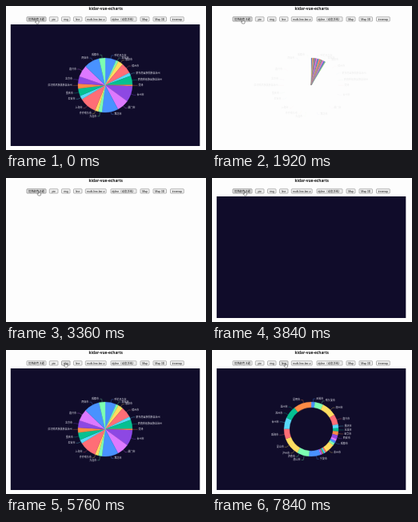
Write an HTML page that moves like this. It is 250x180 px and loops after 8000 ms.

```html
<!DOCTYPE html>
<html lang="zh">
<head>
<meta charset="utf-8">
<title>kidar-vue-echarts</title>
<style>
  html, body { margin: 0; width: 100%; height: 100%; overflow: hidden; background: #fdfdfd; }
  svg { display: block; width: 100vw; height: 100vh; }
  text { font-family: "Liberation Sans", "Noto Sans CJK SC", "Noto Sans CJK", sans-serif; dominant-baseline: central; }
  .title { font: 700 4.8px "Open Sans", sans-serif; text-anchor: middle; fill: #111; }
  .btn rect { fill: #efefef; stroke: #767676; stroke-width: .5; }
  .btn text { font-size: 3.4px; text-anchor: middle; fill: #111; }
  .btn.hover rect { fill: #e3e3e3; stroke: #555; }
  .labels text { font-size: 3px; }
  .labels path { fill: none; stroke-width: .3; }
  .sector { stroke-width: .3; }
</style>
</head>
<body>
<svg viewBox="0 0 250 180">
  <rect width="250" height="180" fill="#fdfdfd"/>
  <text class="title" x="124.8" y="3.1">kidar-vue-echarts</text>
  <g id="buttons"></g>
  <rect id="panel" x="5.8" y="23" width="236.5" height="152" fill="#100c2a"/>
  <g id="charts"></g>
  <path id="cursor" d="M-.5 .4Q0-.4 .5 .4V2.3L2.3 2.8Q2.8 3 2.6 4L2.1 5.8H-.7L-2.1 3.5Q-1.7 2.7-.5 3.5Z"
    fill="#fff" stroke="#222" stroke-width=".45"/>
</svg>
<script>
const LOOP = 8000, STEP = 160, GROW = 1000;
const CX = 124, CY = 99, R = 34;
const DARK = ['#4992ff', '#7cffb2', '#fddd60', '#ff6e76', '#58d9f9', '#05c091', '#ff8a45', '#8d48e3', '#dd79ff'];
const LIGHT = ['#5470c6', '#91cc75', '#fac858', '#ee6666', '#73c0de', '#3ba272', '#fc8452', '#9a60b4', '#ea7ccc'];

const byId = id => document.getElementById(id);
function add(parent, tag, attrs, text) {
  const el = document.createElementNS('http://www.w3.org/2000/svg', tag);
  for (const k in attrs) el.setAttribute(k, attrs[k]);
  if (text) el.textContent = text;
  parent.append(el);
  return el;
}

// Clockwise from twelve o'clock, in degrees
function polar(deg, r) {
  const a = deg * Math.PI / 180;
  return [CX + r * Math.sin(a), CY - r * Math.cos(a)];
}

const buttons = [
  [26, 50, '切换颜色主题'], [54.3, 65, 'pie'], [69.5, 80, 'ring'], [84.5, 95, 'line'],
  [99.3, 125.2, 'multi-line-bar-x'], [131, 163, 'dyline（动态折线）'],
  [168, 179, 'Map'], [184, 200.5, 'Map 3D'], [205.5, 222.3, 'treemap']
].map(([x1, x2, name]) => {
  const g = add(byId('buttons'), 'g', { class: 'btn' });
  add(g, 'rect', { x: x1, y: 13.7, width: x2 - x1, height: 5.4, rx: .7 });
  add(g, 'text', { x: (x1 + x2) / 2, y: 16.5 }, name);
  return { g, x1, x2 };
});

function makeChart({ ends, inner, labels }, colors, ink) {
  const root = add(byId('charts'), 'g', {});
  const sectors = ends.map((end, i) => {
    const color = colors[i % 9];
    return {
      el: add(root, 'path', { class: 'sector', fill: color, stroke: color }),
      from: i ? ends[i - 1] : 0, to: end
    };
  });
  const notes = add(root, 'g', { class: 'labels' });
  for (const [deg, name, dy = 0] of labels) {
    const side = deg < 180 ? 1 : -1;
    const [x1, y1] = polar(deg, R);
    const [x2, y] = polar(deg, R + 4);
    const y2 = y + dy, x3 = x2 + side * 2.6;
    const color = colors[ends.findIndex(e => deg < e) % 9];
    add(notes, 'path', { d: `M${x1} ${y1}L${x2} ${y2}H${x3}`, stroke: color });
    add(notes, 'text', { x: x3 + side, y: y2 - .3, fill: ink, 'text-anchor': side > 0 ? 'start' : 'end' }, name);
  }
  return p => {
    root.style.display = p > 0 ? '' : 'none';
    if (p <= 0) return;
    notes.setAttribute('opacity', p);
    for (const { el, from, to } of sectors) {
      const a = from * p, b = to * p, big = b - a > 180 ? 1 : 0;
      el.setAttribute('d', `M${polar(a, R)}A${R} ${R} 0 ${big} 1 ${polar(b, R)}L${polar(b, inner)}` +
        (inner ? `A${inner} ${inner} 0 ${big} 0 ${polar(a, inner)}Z` : 'Z'));
    }
  };
}

const pie = {
  inner: 0,
  ends: [24, 29, 40, 63, 70, 89, 92, 126, 152, 187, 195, 202, 239, 247, 263, 273.5, 289, 314, 347, 360],
  labels: [
    [12, '呼伦贝尔市'], [26.5, '淮安市'], [34.5, '酒泉市'], [51, '德州市'],
    [66.5, '黔东南苗族侗族自治州'], [80, '黔南布依族苗族自治州'], [90.5, '菏泽'],
    [109, '台州市'], [139, '厦门市'], [168, '潍坊市', -.8],
    [191, '大连市', 1.5], [201, '齐齐哈尔市'], [221, '上海市'], [243, '泰安市'],
    [255, '重庆市'], [269.5, '红河哈尼族彝族自治州'], [281, '北京市'], [301.7, '嘉兴市'],
    [333, '西安市'], [353.5, '成都市']
  ]
};
const ring = {
  inner: 27.2,
  ends: [8, 26, 58, 80, 88, 95, 103, 111, 116, 121, 126, 146, 149, 152, 154, 156, 158, 160, 185, 211, 249, 271, 295, 322, 360],
  labels: [
    [4, '无锡市'], [22, '哈尔滨市'], [45, '湖州市'], [70, '嘉兴市'], [84, '重庆市'],
    [91.5, '玉溪市'], [99, '金华市'], [108, '西安市'], [119, '成都市'], [140, '泰州市'], [169, '宁波市'],
    [195, '眉山市', 1.8], [206, '济南市'], [218, '泸州市'], [234, '昆山市'], [259, '威海市'],
    [284, '台州市'], [302, '沧州市'], [317, '温州市'], [344, '昆明市']
  ]
};

// Each showing: drawing function, when it starts to grow, when it is cleared
const shows = [
  [makeChart(pie, DARK, '#e4e4ee'), -GROW, 1120],
  [makeChart(pie, LIGHT, '#333'), 1640, 3360],
  [makeChart(pie, DARK, '#e4e4ee'), 3880, 6240],
  [makeChart(ring, DARK, '#e4e4ee'), 6690, LOOP]
];

const path = [
  [0, 38.5, 16.3], [640, 38.5, 16.3], [960, 42, 16], [1280, 42, 16], [1440, 38.5, 16.2],
  [2720, 38.5, 16.2], [2880, 41, 16.2], [5120, 41, 16.2], [5680, 74.5, 15.8],
  [6400, 74.5, 15.8], [7040, 92, 16.2], [LOOP, 92, 16.2]
];
function cursorAt(t) {
  const i = path.findIndex(stop => t < stop[0]);
  const [t0, x0, y0] = path[i - 1], [t1, x1, y1] = path[i];
  const k = (t - t0) / (t1 - t0), s = k * k * (3 - 2 * k);
  return [x0 + (x1 - x0) * s, y0 + (y1 - y0) * s];
}

const cubicInOut = k => k < .5 ? 4 * k ** 3 : 1 - 4 * (1 - k) ** 3;

function draw(t) {
  byId('panel').style.display = t >= 1120 && t < 3840 ? 'none' : '';
  for (const [paint, start, end] of shows) {
    const k = Math.min(1, Math.max(0, (t - start) / GROW));
    paint(t < end ? cubicInOut(k) : 0);
  }
  const [x, y] = cursorAt(t);
  byId('cursor').setAttribute('transform', `translate(${x} ${y})`);
  for (const b of buttons) b.g.classList.toggle('hover', x >= b.x1 && x <= b.x2);
}

let last = -1;
function tick(now) {
  const t = Math.floor(now % LOOP / STEP) * STEP;
  if (t !== last) draw(last = t);
  requestAnimationFrame(tick);
}
draw(0);
requestAnimationFrame(tick);
</script>
</body>
</html>
```
